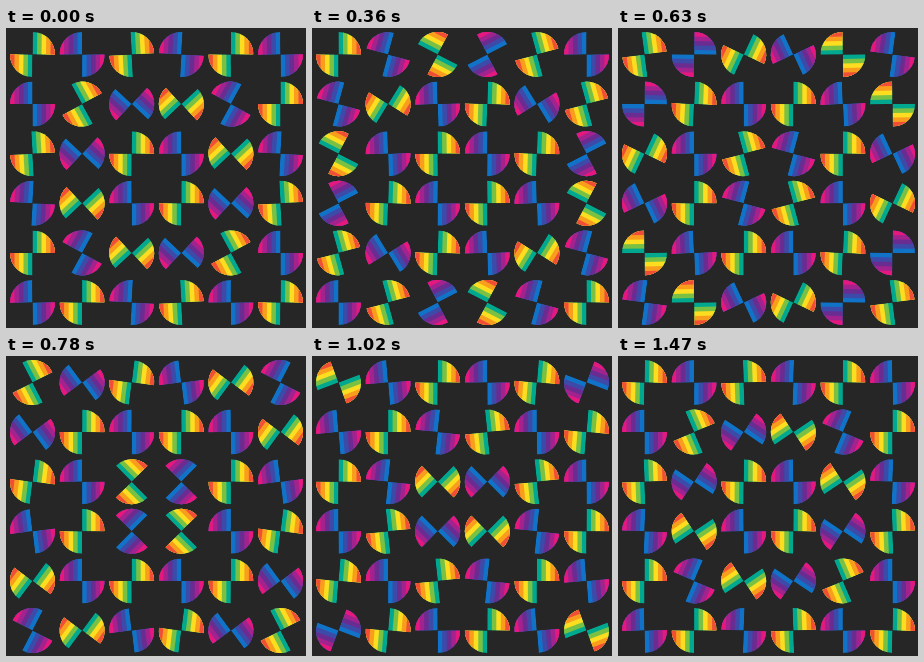
An HTML page with a canvas for the animation above (1.5 s loop, 300 px wide and 300 px high).

```html
<!DOCTYPE html>
<html>
<head>
<meta charset="utf-8">
<style>
html, body { margin: 0; height: 100%; overflow: hidden; background: #262626; }
canvas { display: block; }
</style>
</head>
<body>
<canvas width="300" height="300"></canvas>
<script>
const ctx = document.querySelector('canvas').getContext('2d');
const LOOP = 1500, STEP = 30, SIZE = 6, GAP = 49.6, RADIUS = 22.5, CENTER = 150.5;
// Stripe colours, from the hub outwards
const WARM = ['#00a88f', '#7ac143', '#fddd1f', '#f99d1c', '#f04e37'];
const COOL = ['#1173c7', '#3d4aa8', '#6a2c91', '#a3238e', '#e6187e'];

const ease = p => p < 0.5 ? 0.5 * (2 * p) ** 4 : 1 - 0.5 * (2 - 2 * p) ** 4;

function drawQuarter(colors) {
  const width = RADIUS / colors.length;
  ctx.save();
  ctx.beginPath();
  ctx.moveTo(0, 0);
  ctx.arc(0, 0, RADIUS, -Math.PI / 2, 0);
  ctx.clip();
  colors.forEach((color, i) => {
    ctx.fillStyle = color;
    ctx.fillRect(i * width, -RADIUS, RADIUS - i * width, RADIUS);
  });
  ctx.restore();
}

function drawCell(col, row, time) {
  const x = col - (SIZE - 1) / 2, y = row - (SIZE - 1) / 2;
  const warm = (col + row) % 2 === 0;
  // The half turn spreads outwards from the middle of the grid
  const delay = 507 + 556 * Math.hypot(x, y);
  const phase = ((time - delay) / LOOP + 4.5) % 1;
  ctx.save();
  ctx.translate(CENTER + x * GAP, CENTER + y * GAP);
  if (!warm) ctx.scale(-1, 1);
  ctx.rotate(-Math.PI * ease(phase));
  for (let half = 0; half < 2; half++) {
    drawQuarter(warm ? WARM : COOL);
    ctx.rotate(Math.PI);
  }
  ctx.restore();
}

function frame() {
  const time = Math.floor(performance.now() % LOOP / STEP) * STEP;
  ctx.fillStyle = '#262626';
  ctx.fillRect(0, 0, 300, 300);
  for (let row = 0; row < SIZE; row++)
    for (let col = 0; col < SIZE; col++) drawCell(col, row, time);
  requestAnimationFrame(frame);
}
frame();
</script>
</body>
</html>
```
